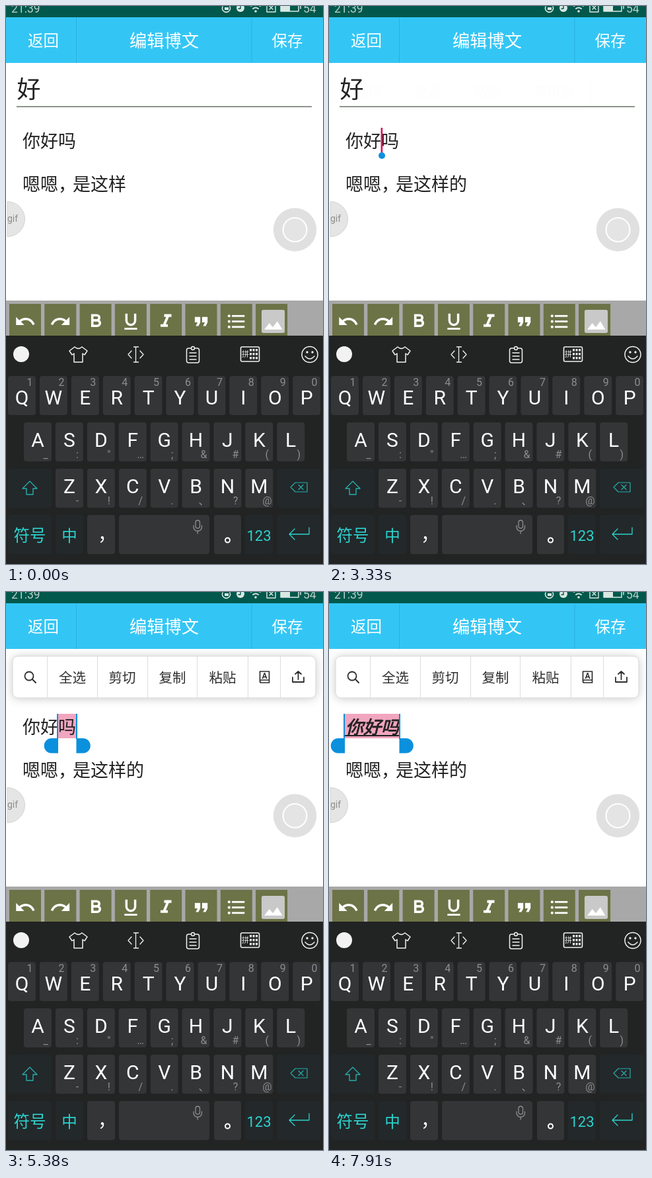
Write an HTML page that moves like this. It is 480x843 px and loops after 8000 ms.

```html
<!DOCTYPE html>
<html lang="zh-CN">
<head>
<meta charset="utf-8">
<style>
html, body { margin: 0; width: 100%; height: 100%; overflow: hidden; background: #fff; }
svg { display: block; }
text { font-family: Roboto, "Noto Sans CJK SC", "Noto Sans CJK", sans-serif; text-anchor: middle; white-space: pre; }
.cjk { font-family: "Noto Sans CJK SC", "Noto Sans CJK", sans-serif; }
.start { text-anchor: start; }
.line { fill: none; stroke-linecap: round; stroke-linejoin: round; }
.menu { filter: drop-shadow(0 1px 7px #0003); }
</style>
</head>
<body>
<svg id="stage" width="480" height="843" viewBox="0 0 480 843"></svg>
<script>
const CYAN = '#2bd3cf', DIM_CYAN = '#25aead', BLUE = '#0a90dd', PINK = '#d81b60';
const rect = (x, y, w, h, fill, more = '') =>
  `<rect x="${x}" y="${y}" width="${w}" height="${h}" fill="${fill}" ${more}/>`;
const circle = (x, y, r, fill, more = '') =>
  `<circle cx="${x}" cy="${y}" r="${r}" fill="${fill}" ${more}/>`;
const text = (x, y, size, str, fill, cls = '', more = '') =>
  `<text x="${x}" y="${y}" font-size="${size}" fill="${fill}" class="${cls}" ${more}>${str.replace(/&/g, '&amp;')}</text>`;
const line = (d, stroke, w = 1.5, more = '') =>
  `<path class="line" d="${d}" stroke="${stroke}" stroke-width="${w}" ${more}/>`;
const group = (id, body, more = '') => `<g id="${id}" ${more}>${body}</g>`;

function statusBar() {
  const c = '#d9e8e3';
  return rect(0, 0, 480, 17, '#02584c') +
    text(8, 10, 17.5, '21:39', '#b9cfc9', 'start') + text(450, 10, 17.5, '54', '#b9cfc9', 'start') +
    line('M328 1a6 6 0 1 0 11 0', c, 1.6) + rect(331, 2, 6, 4, c) +
    circle(355, 3, 6, c) + line('M355 0v4h-3', '#02584c', 1.4) +
    line('M371 0q7-5 14 0M374 4q4-3 8 0', c, 2) + circle(378, 8, 1.8, c) +
    line('M395-4h13v13h-13zM399 0l5 5m0-5l-5 5', c, 1.4) +
    line('M416-4h27v12h-27zM446 0v4', c, 1.5) + rect(416, -4, 14, 12, c);
}

function header() {
  return rect(0, 17, 480, 69, '#33c6f5') + rect(106, 17, 1, 69, '#2db0dc') + rect(371.5, 17, 1, 69, '#2db0dc') +
    text(56.5, 60.5, 23.5, '返回', '#fff', 'cjk') + text(239.5, 61.5, 26.3, '编辑博文', '#fff', 'cjk') +
    text(426, 60.5, 23.5, '保存', '#fff', 'cjk');
}

function bubbles() {
  return '<path d="M2 295.5a26.5 26.5 0 0 1 0 53z" fill="#e4e5e4" stroke="#d2d4d2"/>' +
    text(2, 326, 14, 'gif', '#8b8d8b', 'start') +
    circle(437.5, 338, 32.7, '#e1e0e1') + circle(437.5, 338, 18, '#e5e4e5', 'stroke="#fff" stroke-width="2"');
}

function toolbar() {
  const undo = '<path d="M12.5 8c-2.65 0-5.05 1-6.9 2.6L2 7v9h9l-3.6-3.6c1.4-1.2 3.1-1.9 5.1-1.9 3.5 0 6.5 2.3 7.6 5.5l2.4-.8C21 11 17.2 8 12.5 8z"/>';
  const icons = [
    undo,
    `<g transform="translate(24) scale(-1 1)">${undo}</g>`,
    line('M8.4 5.2h4.9a2.7 2.7 0 0 1 0 5.5H8.4zM8.4 10.8h5.4a2.9 2.9 0 0 1 0 6H8.4z', '#fff', 2.6, 'style="stroke-linejoin:miter"'),
    line('M7.2 3.5V11a4.8 4.8 0 0 0 9.6 0V3.5', '#fff', 2.5, 'style="stroke-linecap:butt"') + rect(5, 19, 14, 2, '#fff'),
    '<path d="M10 4v3h2.2l-3.4 8H6v3h8v-3h-2.2l3.4-8H18V4z"/>',
    '<path d="M6 17h3l2-4V7H5v6h3zm8 0h3l2-4V7h-6v6h3z"/>',
    [6, 12, 18].map(y => circle(4, y, 1.5, '#fff') + rect(7, y - 1, 14, 2, '#fff')).join(''),
    rect(1, -0.7, 25.4, 25.4, '#c8c9c8', 'rx="2"') + '<path d="M4 20.800l5.500-7 3.800 4.500 5-6.500 5.500 9z"/>'
  ];
  return rect(0, 445, 480, 53, '#a9a8a8') + icons.map((icon, i) => {
    const x = 5 + 53.3 * i;
    return rect(x, 450, 48, 48, '#6c7347') +
      `<g fill="#fff" transform="translate(${x + 7.5} 460) scale(1.38)">${icon}</g>`;
  }).join('');
}

const PITCH = 47.9;
function key(x, y, w, dark) {
  return rect(x, y, w, 59, dark ? '#23282a' : '#333537', 'rx="4"');
}
function keyRow(x0, y, letters, letterY, hints, hintY) {
  return [...letters].map((ch, i) => {
    const x = x0 + PITCH * i;
    const body = key(x, y, 42, false);
    return (ch === 'D' ? `<g id="keyD">${body}</g>` : body) +
      text(x + 21, letterY, 30, ch, '#fff') + text(x + 33, hintY, 16, hints[i], '#8d8e90');
  }).join('');
}

function keyboard() {
  return rect(0, 498, 480, 345, '#222323') +
    keyRow(3, 559, 'QWERTYUIOP', 601.5, '1234567890', 574) +
    keyRow(27, 629, 'ASDFGHJKL', 665.5, '_:"…;&#()', 682.5) +
    keyRow(75, 699, 'ZXCVBNM', 735.5, '-!/.、?@', 753) +
    key(3, 699, 66, 1) + line('M36 718l11 11h-6v9h-10v-9h-6z', DIM_CYAN, 1.4) +
    key(410, 699, 67, 1) + line('M431 727l7-7h18v14h-18zM443 723.5l7 7m0-7l-7 7', DIM_CYAN, 1.2) +
    key(3, 769, 66, 1) + text(36, 809, 24.5, '符号', CYAN, 'cjk') +
    key(75, 769, 42, 1) + text(96, 809, 23.5, '中', CYAN, 'cjk') +
    key(123, 769, 42) + text(139, 808, 28, '，', '#fff', 'cjk start') +
    key(171, 769, 137) + rect(287, 777, 6.5, 12, 'none', 'rx="3.2" stroke="#8d8e90" stroke-width="1.3"') +
    line('M284 785v2a6.2 6.2 0 0 0 12.5 0v-2M290.2 793v4', '#8d8e90', 1.3) +
    key(315, 769, 41) + circle(335.5, 807, 3.5, 'none', 'stroke="#fff" stroke-width="2"') +
    key(362, 769, 42, 1) + text(383, 808, 22, '123', CYAN) +
    key(410, 769, 67, 1) + line('M459 788v10h-30m8-8l-8 8 8 8', CYAN, 1.3);
}

function keyboardTools() {
  const w = '#f2f2f2';
  let dots = '';
  for (let i = 0; i < 9; i++) dots += rect(369 + i % 3 * 4.5, 518 + Math.floor(i / 3) * 6, 3, 3.5, w);
  return circle(23, 526, 12, w) +
    line('M104 515l-8 6 4 6 3-2v13h13v-13l3 2 4-6-8-6q-5.5 5-11 0z', w) +
    line('M196.5 515v23m-3-23h7m-7 23h7M190 521l-5 5.5 5 5.5M203 521l5 5.5-5 5.5', w, 1.3) +
    rect(273.5, 517, 19, 22, 'none', `rx="3" stroke="${w}" stroke-width="1.5"`) +
    circle(283, 517, 2.5, '#222323', `stroke="${w}" stroke-width="1.4"`) +
    line('M278 524h10m-10 5h10m-10 5h10', w, 1.4) +
    rect(355.5, 515, 28, 22, 'none', `rx="2" stroke="${w}" stroke-width="1.6"`) +
    text(362.5, 530, 11, '拼', w, 'cjk') + dots +
    circle(460, 526.5, 12, 'none', `stroke="${w}" stroke-width="1.5"`) +
    circle(456, 523, 1.7, w) + circle(464, 523, 1.7, w) + line('M453 529q7 8 14 0', w);
}

function candidates(words) {
  const at = [37, 107, 186, 265, 344, 418];
  return words.split(' ').map((word, i) =>
    text(at[i], 537.5, 29, word, i < 5 ? '#c9c9c9' : 'url(#fade)', 'cjk')).join('') +
    line('M452 518l17 17m0-17l-17 17', '#b5b5b5', 1.4);
}

const panel = w => rect(10, 97, w, 63, '#fff', 'rx="8" stroke="#d6d9d6"');
const splits = (xs, color) => xs.map(x => rect(x, 97, 1, 63, color)).join('');
const labels = (xs, words) => xs.map((x, i) => text(x, 136.5, 20.5, words[i], '#2e2e2e', 'cjk')).join('');

function caretMenu() {
  return panel(385) + rect(10, 97, 94, 63, '#f5f5f6', 'id="pressed" rx="8"') + splits([104, 194, 284], '#c2c4c3') +
    text(59.5, 137, 20.5, '选择', '#2e2e2e', 'cjk', 'id="choose"') +
    labels([149.5, 239.5, 340], ['全选', '粘贴', '常用语']);
}

function selectionMenu() {
  const c = '#2e2e2e';
  return panel(459) + group('items', splits([62, 138, 214, 289, 366, 415], '#dadcda') +
    circle(35, 127, 6.5, 'none', `stroke="${c}" stroke-width="1.8"`) + line('M40 132l5 5', c, 1.9) +
    labels([100.5, 176, 252, 328], ['全选', '剪切', '复制', '粘贴']) +
    line('M398.5 133h-12a2 2 0 0 0 0 4h12v-17h-14v15', c, 1.7) + text(391.5, 131, 12, 'A', c, '', 'font-weight="700"') +
    line('M434 129v7h17v-7M442.5 132v-12m-4.5 4l4.5-4 4.5 4', c, 1.8));
}

stage.innerHTML = `<defs><linearGradient id="fade">
    <stop offset=".5" stop-color="#c9c9c9"/><stop offset="1" stop-color="#333"/>
  </linearGradient></defs>` +
  rect(0, 0, 480, 843, '#fff') + statusBar() + header() +
  text(16.5, 139, 36, '好', '#222', 'cjk start') + rect(16, 151.3, 447, 1.5, '#667364') +
  rect(0, 184, 0, 37, '#f2a5bf', 'id="mark"') +
  text(25, 214, 27, '你好吗', '#222', 'cjk start', 'id="words" stroke="#222"') + rect(24, 216, 83, 2, '#222', 'id="under"') +
  text(25, 279, 27, '嗯嗯，', '#222', 'cjk start') + text(101, 279, 27, '是这样', '#222', 'cjk start') +
  text(182, 279, 27, '的', '#222', 'cjk start', 'id="typed"') +
  rect(182, 253, 2.7, 34, PINK, 'id="caret"') + rect(78.5, 184, 2.7, 37, PINK, 'id="caretTop"') +
  circle(80, 226, 5, BLUE, 'id="grip"') +
  group('handles',
    group('left', rect(-2, 184, 2, 38, BLUE) + '<path d="M0 221h-10a11.3 11.3 0 0 0 0 22.6H0z"/>') +
    rect(106, 184, 2, 38, BLUE) + '<path d="M106.5 221h10a11.3 11.3 0 0 1 0 22.6h-10z"/>', `fill="${BLUE}"`) +
  bubbles() + toolbar() + keyboard() +
  group('tools', keyboardTools()) + group('composing', candidates('的 都 大家 到 得到 多')) +
  group('predicted', candidates('确 我 你们 呀 感觉 那')) +
  group('menu1', caretMenu(), 'class="menu"') + group('menu2', selectionMenu(), 'class="menu"');

const $ = id => document.getElementById(id);
const set = (id, name, value) => $(id).setAttribute(name, value);
const show = (id, on) => set(id, 'opacity', +on);
const ramp = (t, a, b) => Math.min(1, Math.max(0, (t - a) / (b - a)));
const within = (t, a, b) => t >= a && t < b;

function draw(t) {
  // second paragraph: typing, undo, redo
  const typed = within(t, 940, 1710) || t >= 2400;
  show('typed', typed);
  show('caret', within(t, 430, 1550) || within(t, 1710, 2220) || within(t, 2400, 2890));
  set('caret', 'x', typed ? 209 : 182);
  const composing = within(t, 540, 940), predicted = within(t, 940, 2400);
  show('composing', composing);
  show('predicted', predicted);
  show('tools', !composing && !predicted);
  set('keyD', 'opacity', within(t, 430, 650) ? 0.5 : 1);

  // caret and grip in the first paragraph
  const r = 5 + 6.5 * ramp(t, 3330, 3620);
  const gripFade = 1 - 0.2 * ramp(t, 4470, 4670);
  set('caretTop', 'opacity', within(t, 3130, 4870) ? gripFade : 0);
  set('caretTop', 'fill', t < 3620 ? PINK : BLUE);
  set('caretTop', 'width', t < 3620 ? 2.7 : 1.8);
  set('grip', 'r', r);
  set('grip', 'cy', 221 + r);
  set('grip', 'opacity', within(t, 3330, 4870) ? gripFade : 0);

  // selection
  const from = t < 5750 ? 79 : t < 5930 ? 52 : 24;
  set('mark', 'x', from);
  set('mark', 'width', t < 4570 ? 0 : 106.5 - from);
  set('left', 'transform', `translate(${from})`);
  set('handles', 'opacity', ramp(t, 4870, 5050));
  set('words', 'stroke-width', t >= 6840 ? 0.9 : 0);
  set('words', 'font-style', t >= 7910 ? 'italic' : 'normal');
  show('under', t >= 7430);

  // floating menus
  const out = t < 4670 ? 1 - ramp(t, 4470, 5270) : 0.75 * (1 - ramp(t, 4670, 4870));
  set('menu1', 'opacity', ramp(t, 3330, 3700) * out);
  show('pressed', t >= 4250);
  set('choose', 'fill', t >= 4250 ? '#2f9be0' : '#2e2e2e');
  set('menu2', 'opacity', t < 6340 ? ramp(t, 4870, 5210) * (1 - ramp(t, 5610, 5930)) : ramp(t, 6340, 6600));
  set('items', 'transform', `translate(${t < 5380 || within(t, 6340, 6730) ? 1 : 0})`);
}

const begin = performance.now();
function tick() {
  draw((performance.now() - begin) % 8000);
  requestAnimationFrame(tick);
}
tick();
</script>
</body>
</html>
```
